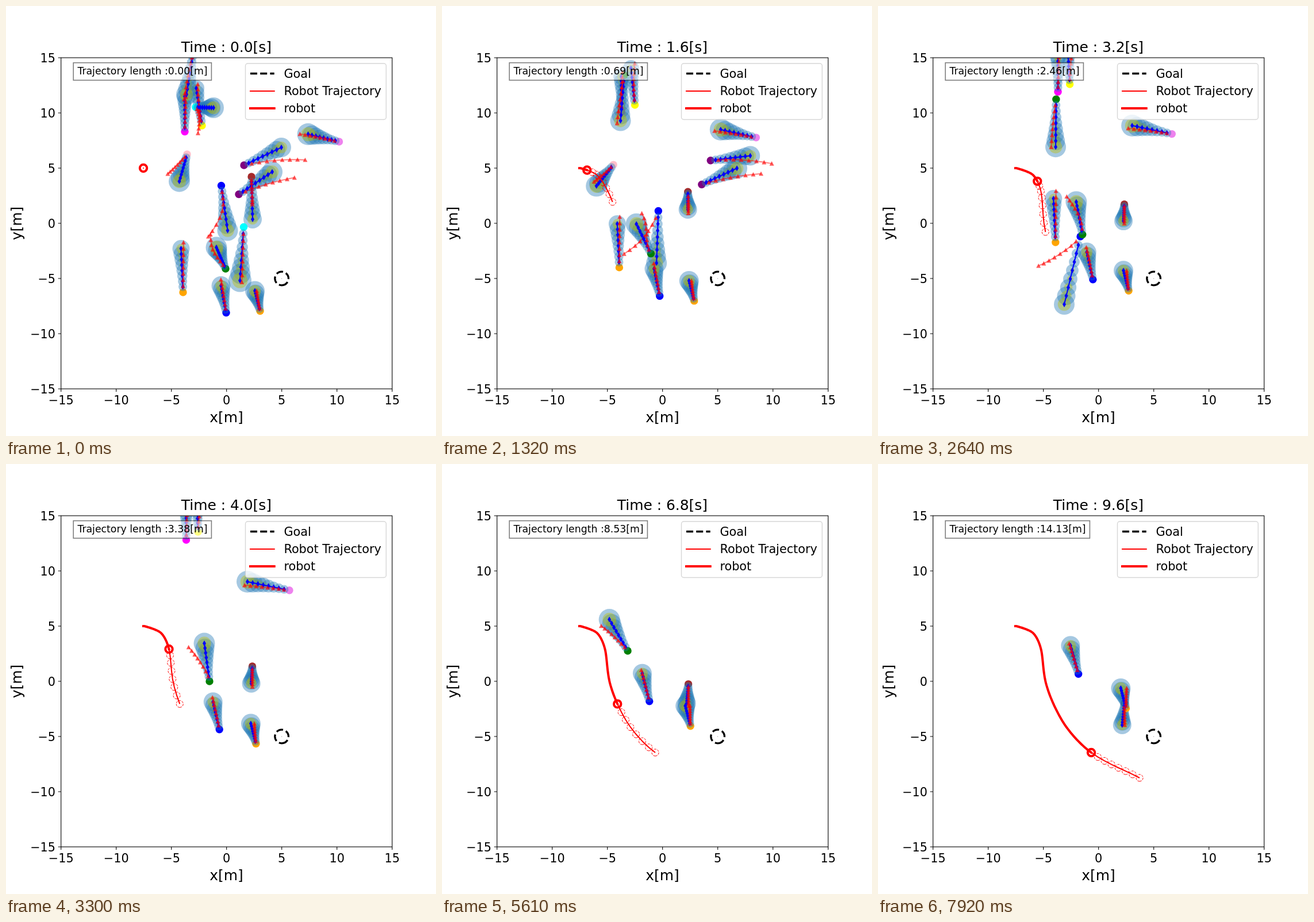
Recreate the animation shown at these times as an HTML page. Size 748 by 748 pixels, loop 8000 ms.

```html
<!DOCTYPE html>
<html lang="en">
<head>
<meta charset="utf-8">
<title>Robot trajectory plot</title>
<style>
  html, body { margin: 0; width: 100%; height: 100%; overflow: hidden; background: #fff; }
  svg { display: block; width: 100vw; height: 100vh; }
  text { font-family: "DejaVu Sans", sans-serif; font-size: 20.78px; fill: #000; }
  .big { font-size: 24.93px; }
  .small { font-size: 17.31px; }
  .mid { text-anchor: middle; }
  .end { text-anchor: end; }
</style>
</head>
<body>
<svg viewBox="0 0 748 748">
  <defs><clipPath id="area"><rect x="95.7" y="90" width="576" height="576"/></clipPath></defs>
  <g clip-path="url(#area)">
    <g id="patches"></g>
    <g id="goal"></g>
    <g id="lines"></g>
  </g>
  <g id="axes" stroke="#000" stroke-width="1.1" fill="none">
    <rect x="95.7" y="90" width="576" height="576"/>
  </g>
  <g id="ticks"></g>
  <text class="big mid" x="383.4" y="724">x[m]</text>
  <text class="big mid" transform="translate(27 378) rotate(-90)">y[m]</text>
  <text class="big mid" id="clock" x="383.4" y="80"></text>
  <rect id="box" x="117.2" y="98.7" height="30.4" fill="#fff" fill-opacity=".5" stroke="#000" stroke-opacity=".5" stroke-width="1.6"/>
  <text class="small" id="dist" x="124.4" y="119"></text>
  <rect x="416.5" y="100" width="244.8" height="97.5" rx="4" fill="#fff" fill-opacity=".8" stroke="#ccc" stroke-opacity=".8" stroke-width="1.4"/>
  <path d="M425 117.5h41.7" stroke="#000" stroke-width="3.3" stroke-dasharray="12 5.2"/>
  <path d="M424 148h43.7" stroke="red" stroke-width="2.1"/>
  <path d="M423 178h45.7" stroke="red" stroke-width="4"/>
  <text x="483.4" y="124.8">Goal</text>
  <text x="483.4" y="155">Robot Trajectory</text>
  <text x="483.4" y="185.3">robot</text>
</svg>
<script>
const STEP = 330, LOOP = 8000, AHEAD = 8;
const $ = id => document.getElementById(id);
const n = v => +v.toFixed(2);
const count = (len, f) => Array.from({ length: len }, (_, i) => f(i + 1));

// Uniformly accelerated motion from (x, y).
const glide = (x, y, vx = 0, vy = 0, ax = 0, ay = 0) =>
  k => [x + vx * k + ax * k * k, y + vy * k + ay * k * k];

// Smooth curve through [step, ...values] rows that never overshoots.
function track(...rows) {
  const slope = (i, c) => (rows[i + 1][c] - rows[i][c]) / (rows[i + 1][0] - rows[i][0]);
  const tangent = (i, c) => {
    if (i === 0) return slope(0, c);
    if (i === rows.length - 1) return slope(i - 1, c);
    const a = slope(i - 1, c), b = slope(i, c);
    return a * b > 0 ? 2 * a * b / (a + b) : 0;
  };
  return k => {
    let i = 0;
    while (i < rows.length - 2 && rows[i + 1][0] < k) i++;
    const h = rows[i + 1][0] - rows[i][0], u = Math.min(1, (k - rows[i][0]) / h), w = 1 - u;
    return rows[i].slice(1).map((v, j) =>
      w * w * (1 + 2 * u) * v + u * u * (3 - 2 * u) * rows[i + 1][j + 1] +
      h * u * w * (w * tangent(i, j + 1) - u * tangent(i + 1, j + 1)));
  };
}

// path: position by step; aim: vector to the predicted end; size: radius there
const agents = [];
const agent = (color, last, size, path, aim) => agents.push({ color, last, size, path, aim });

agent('magenta', 12, 14, glide(311, 218.5, .25, -8.65), glide(0, -61));
agent('yellow', 12, 14, glide(341, 208, -1.8, -9, .11), glide(-10, -65, .8, .3));
agent('cyan', 3, 18, glide(330, 176, 2.5, 3, -.25, .33), glide(31, 1, -11, 10));
agent('green', 8, 18, glide(326, 79, -2.5, 10.4, .06), glide(-12, 75, 1.4, 1));
agent('pink', 4, 18.5, glide(315, 258, -4.2, 4.8, 0, -.07), glide(-13.5, 47, -4, -2.5));
agent('violet', 13, 19, glide(579.5, 236, -8.04, -1.9, -.061, .028), glide(-54, -13, -1.9, -.2));
agent('purple', 4, 17, glide(414, 277, 13.3, -3, 0, .23), glide(65, -31, 1, 5.7));
agent('purple', 6, 18, glide(405, 327.5, 11.3, -4.9, .1, .16), glide(58, -39, .8, 2.7));
agent('brown', 24, 16,
  track([0, 427, 297], [2, 427, 308], [6, 428.5, 337], [10, 428.5, 352], [32, 429, 454]),
  track([0, 2, 74], [2, 1, 36], [6, -1, 29], [24, -4, 38]));
agent('blue', 9, 18,
  track([0, 374.5, 312.5], [3, 378, 345], [8, 352, 401], [14, 297.5, 443], [17, 270, 456]),
  track([0, 11, 78], [2, 16, 92], [6, -25, 89], [8, -28, 118]));
agent('cyan', 1, 20, glide(413.5, 384.5, -.4, 12), glide(-6.5, 93));
agent('green', 21, 18.5,
  track([0, 382, 457], [6, 357.5, 416], [10, 354, 378], [14, 338, 345], [22, 295, 296], [29, 252, 264]),
  track([0, -16, -37], [2, -33, -55], [6, -15, -48], [10, -9, -66], [14, -44, -67], [19, -20, -42]));
agent('orange', 8, 15, glide(308, 498, .1, -10.7, 0, -.02), glide(-3.5, -76));
agent('blue', 24, 16.5, glide(383, 533.5, -1, -7.3, -.018, .012), glide(-9, -47, -.2, -.1));
agent('orange', 24, 17, glide(442, 530.5, -.9, -4.4, .019), glide(-9, -35));

const route = track([0, 239, 282], [2, 240, 282], [6, 268.5, 293], [10, 283.5, 322],
  [14, 290.5, 374], [19, 319.5, 445], [24, 371, 502], [31, 455, 546]);
// how far the plan ends off the route really driven
const drift = track([0, 24, 6], [2, 24, 6], [6, -2, 10], [10, -3, 0], [14, 0, 0]);
const startUp = track([0, 0], [2, .07], [6, 1.66], [10, 3.38], [14, 6.13]);
const travelled = k => k < 13 ? startUp(k)[0] : 6.13 + .8 * (k - 14);

const disc = ([x, y], r, fill, alpha = 1) =>
  `<circle cx="${n(x)}" cy="${n(y)}" r="${n(r)}" fill="${fill}" fill-opacity="${alpha}"/>`;
// starts at the bottom and runs counterclockwise, which places the dashes
const ring = ([x, y], r, color, width, dash = 'none') =>
  `<path d="M${n(x)} ${n(y + r)}a${r} ${r} 0 0 0 0 ${-2 * r}a${r} ${r} 0 0 0 0 ${2 * r}" fill="none" stroke="${color}" stroke-width="${width}" stroke-dasharray="${dash}"/>`;
const line = (pts, color, width, extra = '') =>
  `<polyline points="${pts.map(p => p.map(n)).join(' ')}" fill="none" stroke="${color}" stroke-width="${width}" stroke-linejoin="round" ${extra}/>`;
const marks = (pts, shape, fill, alpha = 1) =>
  pts.map(([x, y]) => `<path d="M${n(x)} ${n(y)}${shape}" fill="${fill}" opacity="${alpha}"/>`).join('');

const DIAMOND = 'm0-5l3 5l-3 5l-3-5z';
const TRIANGLE = 'm0-4l4 7.6h-8z';

function drawAgent({ color, size, path, aim }, k) {
  const head = path(k), reach = aim(k);
  const guess = count(AHEAD, j => head.map((v, c) => v + reach[c] * j / AHEAD));
  const actual = count(AHEAD, j => path(k + j));
  let patch = disc(head, 6.7, color);
  guess.forEach((p, i) => {
    const r = 7.5 + (size - 7.5) * (i / (AHEAD - 1)) ** 1.35;
    patch += disc(p, r, '#1f77b4', .4) + disc(p, r - 6.7, '#bfbf00', .4);
  });
  return [patch,
    line(guess, 'blue', 2) + marks(guess, DIAMOND, 'blue') +
    line(actual, 'red', 2, 'opacity=".5"') + marks(actual, TRIANGLE, 'red', .65)];
}

function drawRobot(k) {
  const here = route(k), body = ring(here, 6.2, 'red', 4);
  if (k === 0) return [body, disc(here, 1, 'red')];
  const off = drift(k);
  const plan = count(7, j => route(k + j).map((v, c) => v + off[c] * (j / 7) ** 2.5));
  const past = [route(0), ...count(k * 4, i => route(i / 4))];
  return [body + plan.map(p => ring(p, 6, 'red', 1, '3.8 1.7')).join(''),
    line(past, 'red', 4, 'stroke-linecap="square"') + line([here, ...plan], 'red', 2)];
}

function buildAxes() {
  let ticks = '', labels = '';
  for (let v = -15; v <= 15; v += 5) {
    const x = n(383.7 + v * 19.2), y = n(378 - v * 19.2), s = String(v).replace('-', '\u2212');
    ticks += `<path d="M${x} 666v5M95.7 ${y}h-5"/>`;
    labels += `<text class="mid" x="${x}" y="693.3">${s}</text><text class="end" x="86" y="${n(y + 7.8)}">${s}</text>`;
  }
  $('axes').innerHTML += ticks;
  $('ticks').innerHTML = labels;
  const goal = [479.6, 474];
  $('goal').innerHTML = ring(goal, 11.8, '#000', 3.3, '12 5.2') + disc(goal, .6, '#777');
}

function draw(k) {
  const parts = agents.filter(a => k <= a.last).map(a => drawAgent(a, k));
  parts.push(drawRobot(k));
  $('patches').innerHTML = parts.map(p => p[0]).join('');
  $('lines').innerHTML = parts.map(p => p[1]).join('');
  const length = travelled(k).toFixed(2);
  $('clock').textContent = `Time : ${(k * .4).toFixed(1)}[s]`;
  $('dist').textContent = `Trajectory length :${length}[m]`;
  $('box').setAttribute('width', 240.2 + 11 * (length.length - 4));
}

let shown = -1;
const start = performance.now();
function tick() {
  const k = Math.floor((performance.now() - start) % LOOP / STEP);
  if (k !== shown) draw(shown = k);
  requestAnimationFrame(tick);
}
buildAxes();
tick();
</script>
</body>
</html>
```
